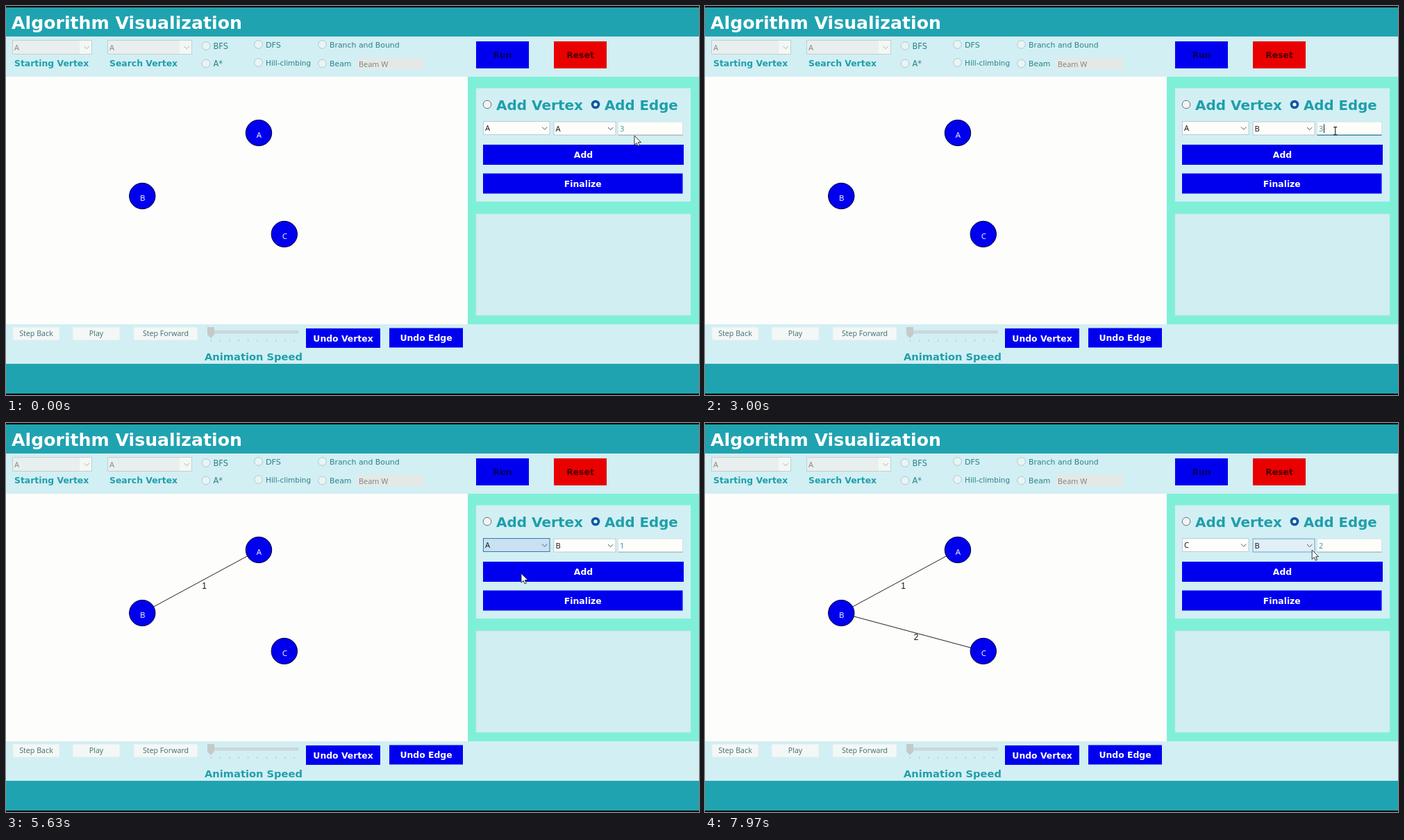
These frames come from a looping animation (998 px wide and 561 px high, 8000 ms). An HTML page:

```html
<!DOCTYPE html>
<html lang="en">
<head>
<meta charset="utf-8">
<title>Algorithm Visualization</title>
<style>
  html, body { margin: 0; width: 100%; height: 100%; overflow: hidden; background: #20a3b0; }
  svg { display: block; width: 100vw; height: 100vh; }
  text { white-space: pre; }
  .b { font-family: "DejaVu Sans", sans-serif; font-weight: bold; }
  .r { font-family: "DejaVu Sans", sans-serif; }
  .u { font-family: "Open Sans", "Noto Sans", sans-serif; }
  .l { font-family: "Liberation Sans", Arial, sans-serif; }
</style>
</head>
<body>
<svg id="stage" viewBox="0 0 998 561" preserveAspectRatio="none"></svg>
<script>
const NS = 'http://www.w3.org/2000/svg';
const stage = document.getElementById('stage');
const TEAL = '#1f9faa', BAR = '#d2eff4', BLUE = '#0000ef', LOOP = 8000;

function add(tag, attrs, parent = stage) {
  const node = document.createElementNS(NS, tag);
  set(node, attrs);
  return parent.appendChild(node);
}
function set(node, attrs) {
  for (const k in attrs) node.setAttribute(k, attrs[k]);
}
const rect = (x, y, w, h, fill, more) => add('rect', { x, y, width: w, height: h, fill, ...more });
const path = (d, stroke, more) => add('path', { d, stroke, fill: 'none', ...more });
function text(str, x, y, size, fill, cls = 'b', anchor = 'start') {
  const node = add('text', { x, y, 'font-size': size, fill, class: cls, 'text-anchor': anchor });
  node.textContent = str;
  return node;
}
function button(label, x, y, w, h, fill = BLUE, ink = '#fff') {
  const box = rect(x, y, w, h, fill);
  text(label, x + w / 2, y + h / 2 + 4.5, 12.4, ink, 'b', 'middle');
  return box;
}
function softButton(label, x, w) {
  rect(x, 463, w, 19, '#f3f8f6', { rx: 1.5, stroke: '#e2eeee' });
  text(label, x + w / 2, 476.3, 10.7, '#3f6d70', 'u', 'middle');
}
function combo(x, y, w, h, disabled) {
  const box = rect(x + .5, y + .5, w - 1, h - 1, disabled ? '#e9efee' : '#fdfdfc',
    { stroke: disabled ? '#c3cfce' : '#c0cccc' });
  if (disabled) rect(x + w - 18, y + 1, 17, h - 2, '#f4f8f5');
  const label = text('A', x + 3, y + h / 2 + 4.3, 11.2, disabled ? '#7c8786' : '#111', 'u');
  path(`M${x + w - 11.5} ${y + h / 2 - 1.5}l3.7 3.7l3.7 -3.7`, disabled ? '#a5b0b0' : '#555');
  return { box, label, x, y, w, h };
}
function radio(label, x, y, size = 11) {
  add('circle', { cx: x, cy: y, r: 5.8, fill: '#e9f5f5', stroke: '#b3c6c8' });
  text(label, x + 10.5, y + 4.2, size, '#2c8087', 'r');
}

// Bars and panels
rect(0, 0, 998, 561, '#000');
rect(0, 2, 998, 557, '#20a3b0');
rect(0, 44, 998, 58, BAR);
rect(0, 102, 665, 357, '#fdfdfb');
rect(665, 102, 333, 357, '#7ff0d7');
rect(0, 459, 998, 57, BAR);
rect(677, 118.5, 309, 163.5, BAR);
rect(677, 300, 309, 146, '#d1eef2', { stroke: '#c2e6e2', 'stroke-width': .8 });

// Top bar
text('Algorithm Visualization', 8, 33, 25.2, '#fff');
combo(9, 49, 115, 21, true);
combo(146, 49, 122, 21, true);
text('Starting Vertex', 12, 87, 12.4, TEAL);
text('Search Vertex', 149, 87, 12.4, TEAL);
radio('BFS', 288, 57.5, 11.4);
radio('A*', 288, 83, 11.4);
radio('DFS', 363.5, 55.5, 11.2);
radio('Hill-climbing', 363.5, 81.5, 10.5);
radio('Branch and Bound', 455.5, 55.5, 10.9);
radio('Beam', 455.5, 83, 10.9);
rect(505, 75, 97, 16, '#e5e9e6');
text('Beam W', 508, 87.5, 10.9, '#7b8080', 'u');
button('Run', 677, 51, 76, 39, BLUE, '#00005c');
button('Reset', 789, 51, 76, 39, '#e90000', '#4a0000');

// Bottom bar
softButton('Step Back', 10, 67);
softButton('Play', 96, 68);
softButton('Step Forward', 184, 92);
rect(295, 468.5, 126, 3.5, '#cfd9d9', { stroke: '#bccaca', 'stroke-width': .6 });
for (let i = 0; i < 10; i++) rect(295 + i * 13.3, 481, 1, 3, '#b5c7c8');
path('M290 463h10v11l-5 5l-5 -5z', 'none', { fill: '#c6c9c9' });
text('Animation Speed', 286, 511, 14.65, TEAL);
button('Undo Vertex', 432, 465, 107, 28);
button('Undo Edge', 552, 464.5, 106, 28);

// Graph
function edge(d, label, x, y) {
  const group = add('g', {});
  add('path', { d, stroke: '#222', fill: 'none' }, group);
  group.append(text(label, x, y, 12, '#111', 'l', 'middle'));
  return group;
}
const edgeAB = edge('M364 183L196 274', '1', 285.5, 239);
const edgeBC = edge('M196 274L401 329', '2', 304, 312.5);
for (const [name, cx, cy] of [['A', 364, 183], ['B', 196.3, 274], ['C', 400.8, 329]]) {
  add('circle', { cx, cy, r: 18.7, fill: BLUE, stroke: '#000030' });
  text(name, cx + .5, cy + 7, 11.5, '#fff', 'u', 'middle');
}

// Edge form
add('circle', { cx: 693, cy: 142, r: 5.8, fill: '#f2f5f4', stroke: '#6c7676' });
add('circle', { cx: 849, cy: 142, r: 6.3, fill: '#0b58a8' });
add('circle', { cx: 849, cy: 142, r: 2.6, fill: '#fff' });
text('Add Vertex', 706, 150, 20, TEAL);
text('Add Edge', 862, 150, 19.8, TEAL);
const from = combo(687, 166, 96.5, 20);
const to = combo(788.5, 166.5, 90, 20);
rect(881.5, 167, 93, 19.5, '#fdfdfa', { stroke: '#d3dedd', 'stroke-width': .8 });
const underline = rect(881.5, 185.5, 93, 1.3, '#999');
const weight = text('3', 884, 181, 11.2, '#38969c', 'u');
const caret = rect(891, 170.5, 1, 12.5, '#222');
const addBox = button('Add', 687, 200, 289, 29);
button('Finalize', 687, 241.5, 287.5, 29);

// Pointers
const arrow = path('M0 0V13.2L3.1 10.4L5.2 15L7.3 14.1L5.3 9.6H9.4Z', '#222',
  { fill: '#fff', 'stroke-width': .9 });
const beam = path('M-2.5 -5.5H-.6L0 -5L.6 -5.5H2.5M0 -5V5M-2.5 5.5H-.6L0 5L.6 5.5H2.5', '#222',
  { 'stroke-width': 1.1 });

// Pointer stops: time, x, y
const stops = [
  [0, 905, 187], [350, 904, 186], [900, 875, 180], [1500, 873, 179],
  [1970, 829, 208], [2250, 826, 207], [2850, 908, 180], [3500, 906, 181],
  [4000, 888, 215], [4500, 887, 215], [5000, 774, 178], [5280, 773, 178],
  [5630, 742, 217], [5780, 740, 223], [5950, 742, 222], [6350, 905, 187],
  [6850, 905, 187], [7200, 889, 214], [7480, 888, 214], [7900, 875, 184], [8000, 874, 183]
];
function pointer(t) {
  let i = 1;
  while (i < stops.length - 1 && t > stops[i][0]) i++;
  const [t0, x0, y0] = stops[i - 1], [t1, x1, y1] = stops[i];
  const p = (t - t0) / (t1 - t0), e = p * p * (3 - 2 * p);
  return [x0 + (x1 - x0) * e, y0 + (y1 - y0) * e];
}
const between = (t, a, b) => t >= a && t < b;
const show = (node, on) => set(node, { visibility: on ? 'visible' : 'hidden' });

function styleCombo(c, value, open, hover) {
  c.label.textContent = value;
  set(c.box, {
    fill: open ? '#c9e1f2' : hover ? '#e2eff6' : '#fdfdfc',
    stroke: open ? '#3478a6' : hover ? '#69a5cc' : '#c0cccc'
  });
}

function draw(t) {
  const [x, y] = pointer(t);
  const inside = (bx, by, w, h) => x >= bx && x <= bx + w && y >= by && y <= by + h;
  const toOpen = between(t, 1400, 2220), fromOpen = between(t, 5200, 5860);
  const free = !toOpen && !fromOpen;
  const over = c => free && inside(c.x, c.y, c.w, c.h);
  styleCombo(from, t < 5860 ? 'A' : 'C', fromOpen, over(from));
  styleCombo(to, t < 2220 ? 'A' : 'B', toOpen, over(to));

  const typing = between(t, 2900, 4350) || between(t, 6360, 7350);
  const overField = free && inside(882, 167, 92, 19);
  weight.textContent = t < 3050 ? '3' : t < 3250 ? '' : t < 6600 ? '1' : t < 6720 ? '' : '2';
  set(weight, { fill: between(t, 3250, 6600) ? '#3a8bb0' : '#38969c' });
  set(underline, { fill: typing ? '#25789f' : overField ? '#7c8f90' : '#a9b5b4' });
  const started = t < 5000 ? 2900 : 6360;
  show(caret, typing && (t - started) % 1000 < 500);
  set(caret, { x: weight.textContent ? 891 : 884.5 });

  const hot = free && inside(687, 200, 289, 29);
  set(addBox, { fill: hot ? '#6e65df' : BLUE, stroke: hot ? '#e8edf8' : 'none' });
  show(edgeAB, t >= 4370);
  show(edgeBC, t >= 7370);

  const textMode = overField && t > 2500;
  show(arrow, !textMode);
  show(beam, textMode);
  set(textMode ? beam : arrow, { transform: `translate(${x.toFixed(2)} ${y.toFixed(2)})` });
}

function tick() {
  draw(performance.now() % LOOP);
  requestAnimationFrame(tick);
}
tick();
</script>
</body>
</html>
```
